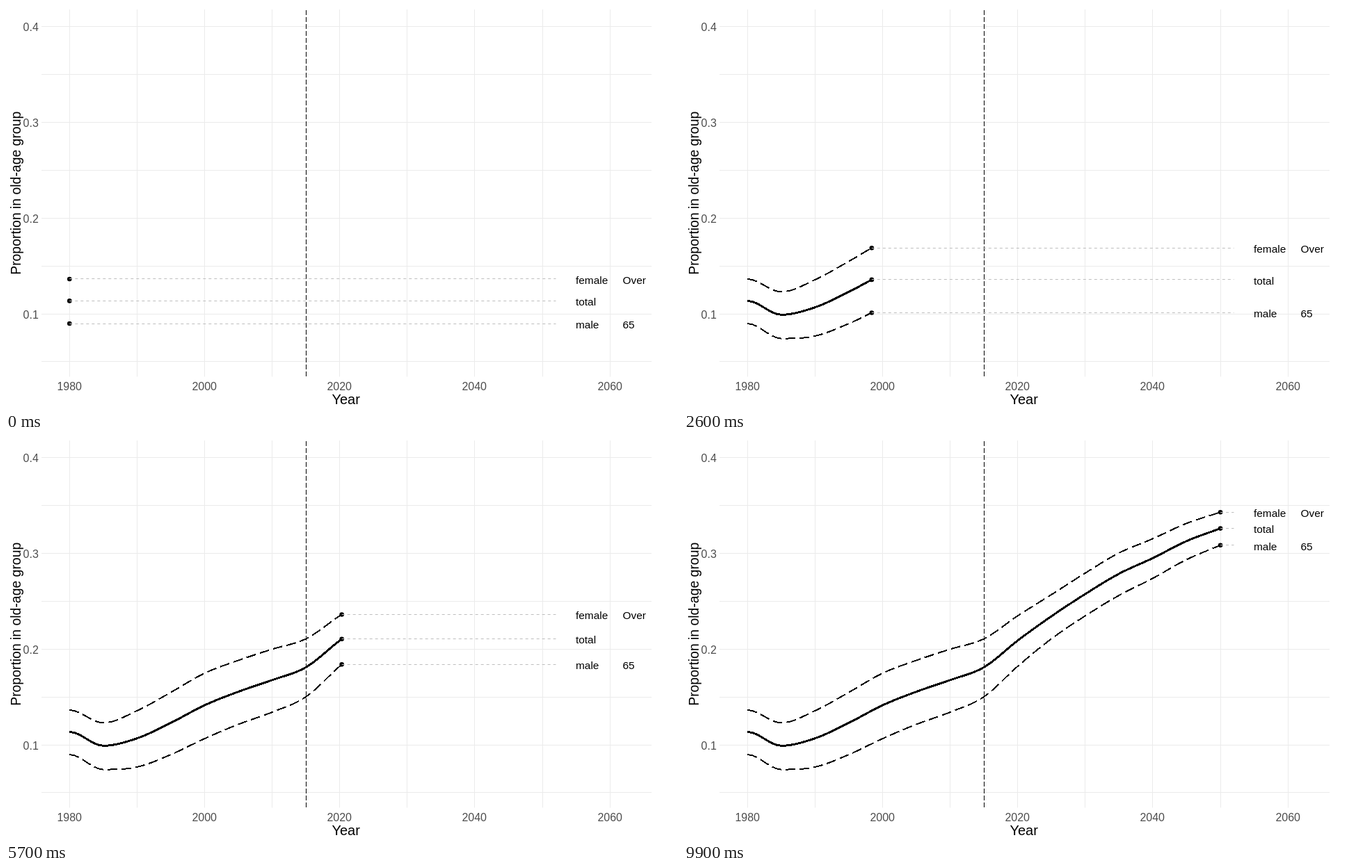
An HTML page for the animation above (10000 ms loop, 966 by 580 pixels).

```html
<!DOCTYPE html>
<html lang="en">
<head>
<meta charset="utf-8">
<title>Proportion in old-age group</title>
<style>
html, body { margin: 0; width: 100%; height: 100%; overflow: hidden; background: #fff; }
svg { display: block; width: 966px; height: 580px; font-family: "Liberation Sans", Arial, sans-serif; }
.grid { stroke: #ebebeb; }
.tick { font-size: 16px; fill: #4d4d4d; }
.label { font-size: 15.4px; }
.curve { fill: none; stroke: #000; stroke-linejoin: round; shape-rendering: crispEdges; }
.guide { stroke: #bebebe; stroke-dasharray: 4 4; }
</style>
</head>
<body>
<svg id="stage" viewBox="0 0 966 580"></svg>
<script>
const STEPS = 100, STEP_MS = 100;
const FIRST_YEAR = 1980, LAST_YEAR = 2050, SPAN = 5;
const LEFT = 51, RIGHT = 928, TOP = 5, BOTTOM = 533.5;
const GUIDE_END = 790.5;

// Percent over 65, one value every SPAN years
const FEMALE = [13.63, 12.29, 13.56, 15.48, 17.48, 18.82, 19.99, 21.07, 23.47, 25.69, 27.94, 30.04, 31.53, 33.13, 34.29];
const MALE = [8.98, 7.42, 7.68, 8.98, 10.65, 12.14, 13.41, 15.01, 18.21, 21.08, 23.47, 25.61, 27.39, 29.35, 30.84];
const FEMALE_SHARE = 0.51;

const female = smooth(FEMALE), male = smooth(MALE);
const total = year => FEMALE_SHARE * female(year) + (1 - FEMALE_SHARE) * male(year);

const SERIES = [
  { name: "female", note: "Over", value: female, width: 2, dash: "14 6" },
  { name: "total", note: "", value: total, width: 3, dash: "none" },
  { name: "male", note: "65", value: male, width: 2, dash: "14 6" }
];

const stage = document.getElementById("stage");

function add(tag, attrs, text = "") {
  const el = document.createElementNS("http://www.w3.org/2000/svg", tag);
  for (const key in attrs) el.setAttribute(key, attrs[key]);
  el.textContent = text;
  return stage.appendChild(el);
}

const line = (x1, y1, x2, y2, attrs) => add("line", { x1, y1, x2, y2, ...attrs });
const crisp = v => Math.floor(v) + 0.5;
const yearX = year => 91.3 + (year - FIRST_YEAR) * 9.711;
const percentY = percent => 443 - (percent - 10) * 13.78;
const yearAt = step => FIRST_YEAR + (LAST_YEAR - FIRST_YEAR) * step / (STEPS - 1);

// Cubic curve through evenly spaced values, flat at the start and at turning points
function smooth(values) {
  const last = values.length - 1;
  const tangent = i => {
    if (i === 0) return 0;
    const before = values[i] - values[i - 1];
    if (i === last) return before;
    const after = values[i + 1] - values[i];
    return before * after > 0 ? (before + after) / 2 : 0;
  };
  return year => {
    const pos = (year - FIRST_YEAR) / SPAN;
    const i = Math.min(Math.floor(pos), last - 1);
    const t = pos - i, u = 1 - t;
    return values[i] * (1 + 2 * t) * u * u + values[i + 1] * (3 - 2 * t) * t * t
      + t * u * (tangent(i) * u - tangent(i + 1) * t);
  };
}

function drawAxes() {
  for (let percent = 5; percent <= 40; percent += 5) {
    const y = crisp(percentY(percent));
    line(LEFT, y, RIGHT, y, { class: "grid" });
    if (percent % 10 === 0) {
      add("text", { x: 46.8, y: y + 6.3, class: "tick", "text-anchor": "end" }, (percent / 100).toFixed(1));
    }
  }
  for (let year = 1980; year <= 2060; year += 10) {
    const x = crisp(yearX(year));
    line(x, TOP, x, BOTTOM, { class: "grid" });
    if (year % 20 === 0) {
      add("text", { x: x - 0.3, y: 553, class: "tick", "text-anchor": "middle" }, year);
    }
  }
  add("text", { x: 488.7, y: 573, "font-size": 20, "text-anchor": "middle" }, "Year");
  add("text", { transform: "translate(21 269.3) rotate(-90)", "font-size": 19.4, "text-anchor": "middle" },
    "Proportion in old-age group");
}

drawAxes();

for (const s of SERIES) {
  s.points = Array.from({ length: STEPS }, (_, step) => {
    const year = yearAt(step);
    return [yearX(year), percentY(s.value(year))];
  });
  s.path = add("polyline", { class: "curve", "stroke-width": s.width, "stroke-dasharray": s.dash });
}
for (const s of SERIES) s.dot = add("circle", { r: 3.3 });
line(431.5, Math.floor(BOTTOM), 431.5, TOP, { stroke: "#000", "stroke-dasharray": "7 3" });
for (const s of SERIES) {
  s.guide = line(0, 0, GUIDE_END, 0, { class: "guide" });
  s.texts = [add("text", { x: 819, class: "label" }, s.name)];
  if (s.note) s.texts.push(add("text", { x: 886.5, class: "label" }, s.note));
}

function show(step) {
  for (const s of SERIES) {
    const [x, y] = s.points[step];
    s.path.setAttribute("points", s.points.slice(0, step + 1).map(p => p.map(v => v.toFixed(2))).join(" "));
    s.dot.setAttribute("cx", x);
    s.dot.setAttribute("cy", y);
    s.guide.setAttribute("x1", x);
    s.guide.setAttribute("y1", crisp(y));
    s.guide.setAttribute("y2", crisp(y));
    for (const text of s.texts) text.setAttribute("y", Math.round(y + 6.8));
  }
}

const start = performance.now();
let shown = -1;

function tick() {
  const step = Math.floor((performance.now() - start) / STEP_MS) % STEPS;
  if (step !== shown) show(shown = step);
  requestAnimationFrame(tick);
}
tick();
</script>
</body>
</html>
```
